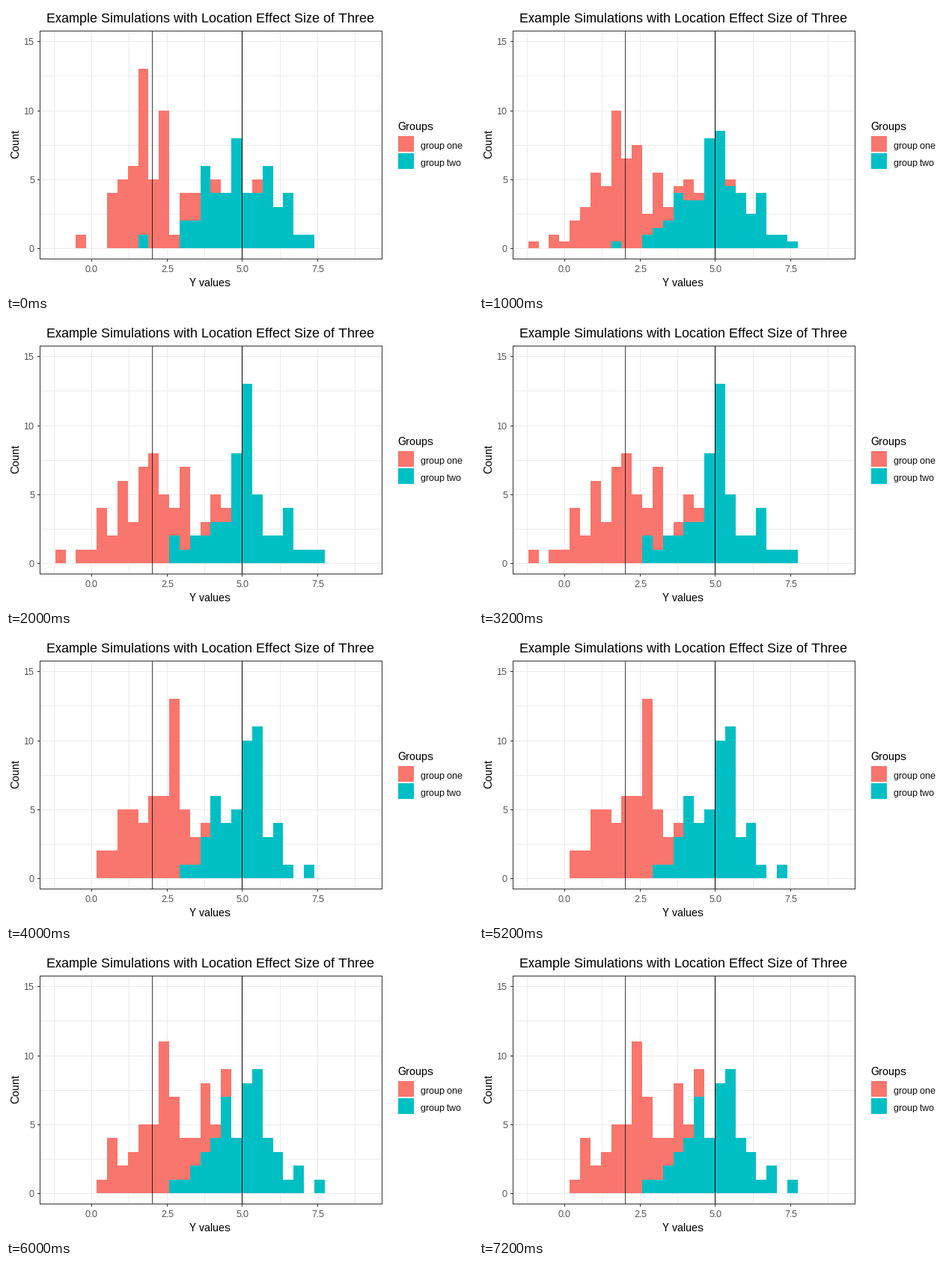
Recreate the animation shown at these times as a matplotlib script. Size 624x384 px, loop 8 s.

```python
import numpy as np
import matplotlib.pyplot as plt
from matplotlib.animation import FuncAnimation
from matplotlib.patches import Rectangle

W, H, DPI = 624, 384, 96
RED, TEAL = "#F8766D", "#00BFC4"
GRID, FRAME, LABEL = "#EBEBEB", "#333333", "#4D4D4D"
N_BINS = 26

plt.rcParams.update({
    "font.family": "Liberation Sans",
    "text.hinting": "native",
    "text.hinting_factor": 1,
})


def x_pix(value):
    return round(114.2 + 40.24 * value)


def y_pix(count):
    return round(324.4 - 18.48 * count)


def counts(start, values):
    row = np.zeros(N_BINS)
    row[start:start + len(values)] = values
    return row


# Each sample: counts of group one, counts of group two
SAMPLES = np.array([
    [counts(2, [1, 0, 0, 4, 5, 6, 12, 5, 10, 1, 2, 2, 0, 1, 0, 0, 0, 1]),
     counts(8, [1, 0, 0, 0, 2, 2, 6, 4, 4, 8, 4, 4, 6, 3, 4, 1, 1])],
    [counts(0, [1, 0, 1, 1, 4, 2, 6, 3, 7, 8, 5, 2, 6, 0, 1, 2, 1]),
     counts(11, [2, 1, 2, 2, 3, 3, 8, 13, 5, 2, 2, 4, 1, 1, 1])],
    [counts(4, [2, 2, 5, 5, 4, 6, 6, 13, 4, 2, 1]),
     counts(12, [1, 1, 3, 6, 4, 5, 10, 11, 3, 4, 1, 0, 1])],
    [counts(4, [1, 4, 2, 3, 5, 5, 11, 6, 3, 2, 5, 1, 2]),
     counts(11, [1, 1, 2, 3, 4, 7, 4, 8, 9, 4, 3, 1, 2, 0, 1])],
])

# Position along the samples for each second; 0.5 is halfway between two
STEPS = [0, 0.5, 1, 1, 2, 2, 3, 3]

fig = plt.figure(figsize=(W / DPI, H / DPI), dpi=DPI, facecolor="white")
ax = fig.add_axes([0, 0, 1, 1])
ax.set_xlim(0, W)
ax.set_ylim(H, 0)
ax.axis("off")


def box(x0, y0, x1, y1, color, z=1, alpha=1):
    patch = Rectangle((x0, y0), x1 - x0, y1 - y0, facecolor=color,
                      linewidth=0, zorder=z, alpha=alpha)
    return ax.add_patch(patch)


def label(x, y, text, px, color="black", **kw):
    kw.setdefault("va", "baseline")
    ax.text(x, y, text, fontsize=px * 72 / DPI, color=color, **kw)


LEFT, TOP, RIGHT, BOTTOM = 45, 33, 502, 338

# Grid, ticks and tick labels
for v in np.arange(-1.25, 9, 1.25):
    x = x_pix(v)
    box(x, TOP, x + 1, BOTTOM, GRID)
for v in np.arange(0, 15.1, 2.5):
    y = y_pix(v)
    box(LEFT, y, RIGHT, y + 1, GRID)
for v in (0, 2.5, 5, 7.5):
    x = x_pix(v)
    box(x, BOTTOM, x + 1, BOTTOM + 4, FRAME)
    label(x + 0.5, 356, f"{v:.1f}", 12, LABEL, ha="center")
for v in (0, 5, 10, 15):
    y = y_pix(v)
    box(LEFT - 3, y, LEFT, y + 1, FRAME)
    label(38, y + 5, str(v), 12, LABEL, ha="right")

# Group means and panel border
box(x_pix(2), TOP, x_pix(2) + 1, BOTTOM, "black", 4, 0.75)
box(x_pix(5), TOP, x_pix(5) + 1, BOTTOM, "black", 4)
for x in (LEFT, RIGHT):
    box(x, TOP, x + 1, BOTTOM + 1, FRAME, 5)
for y in (TOP, BOTTOM):
    box(LEFT, y, RIGHT + 1, y + 1, FRAME, 5)

# Titles and legend
label(273, 22, "Example Simulations with Location Effect Size of Three", 18,
      ha="center")
label(272.5, 375, "Y values", 15, ha="center")
label(20, 185, "Count", 15, ha="right", va="center", rotation=90)
label(523, 166, "Groups", 15)
for y, color, name in ((174, RED, "group one"), (197, TEAL, "group two")):
    box(524, y, 545, y + 21, color)
    label(554, y + 17, name, 12)

edges = np.rint(65.72 + 13.85 * np.arange(N_BINS + 1))
bars = [[box(a, y_pix(0), b, y_pix(0), color, 3)
         for a, b in zip(edges, edges[1:])] for color in (RED, TEAL)]


def place(bar, low, high):
    bar.set_y(y_pix(high))
    bar.set_height(y_pix(low) - y_pix(high))


def update(i):
    pos = STEPS[i]
    k = int(pos)
    mix = pos - k
    one, two = SAMPLES[k]
    if mix:
        one, two = (1 - mix) * SAMPLES[k] + mix * SAMPLES[k + 1]
    for r, t, n1, n2 in zip(*bars, one, two):
        place(t, 0, n2)
        place(r, n2, n2 + n1)
    return bars[0] + bars[1]


anim = FuncAnimation(fig, update, frames=len(STEPS), interval=1000,
                     repeat=True, repeat_delay=0)
plt.show()
```
